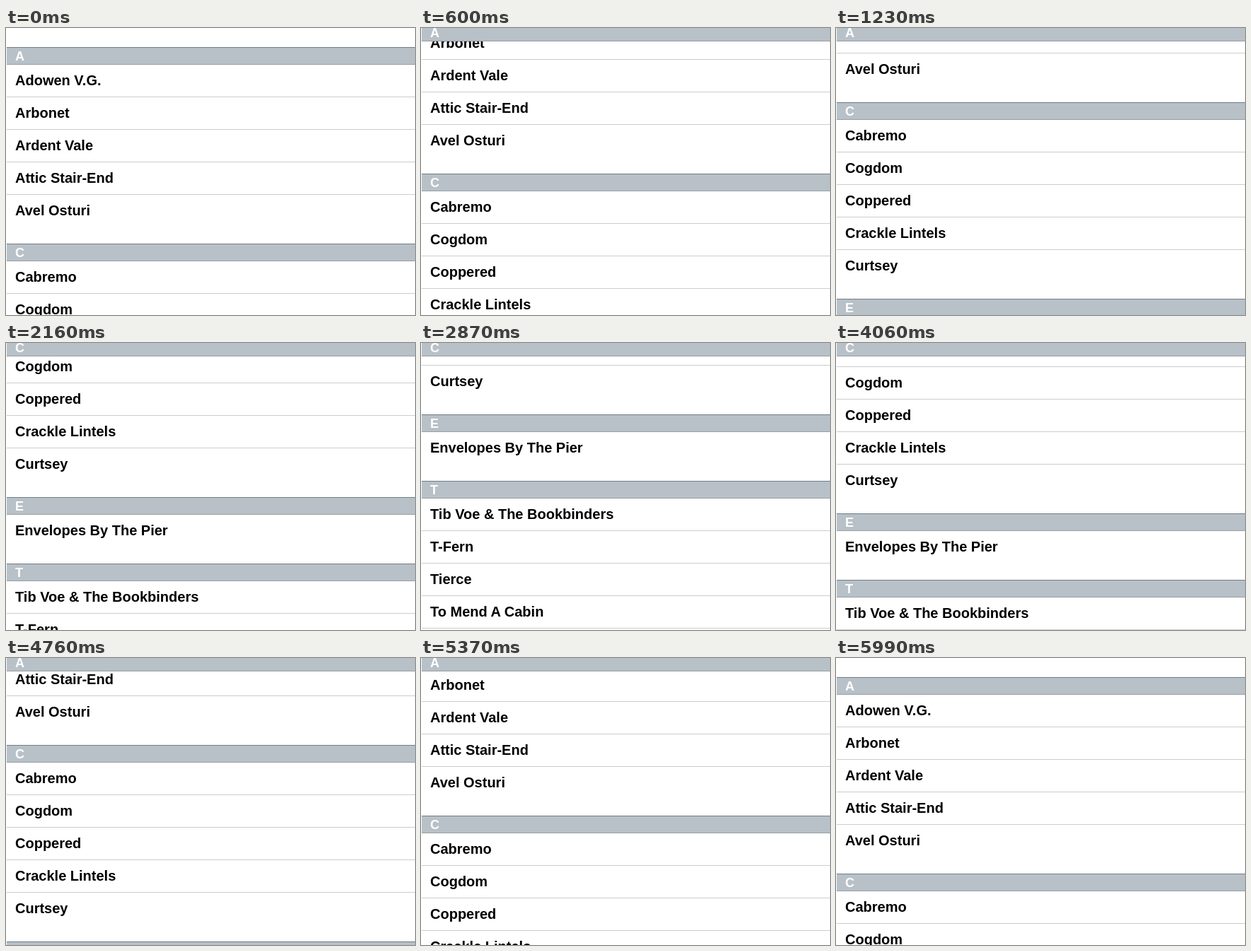
An HTML page that plays this animation: 578x406 px, repeating every 6450 ms.

```html
<!DOCTYPE html>
<html lang="en">
<head>
<meta charset="utf-8">
<title>Sticky list</title>
<style>
  html, body { margin: 0; width: 100%; height: 100%; overflow: hidden; background: #fff; }
  body { position: relative; }
  #list { position: absolute; top: 3px; left: 1px; right: 0; }
  dl { margin: 0; padding-top: 24px; }
  dt, dd { margin: 0; white-space: nowrap; font-family: "Liberation Sans", Arial, sans-serif; font-weight: bold; }
  dt {
    position: relative; z-index: 1; box-sizing: border-box; height: 25px;
    padding: 2px 0 0 12px; font-size: 18px; line-height: 21px;
    color: #fff; background: #b8c1c8;
    border-top: 1px solid #717d85; border-bottom: 1px solid #989ea4;
  }
  dd { padding-left: 12px; font-size: 20px; line-height: 45px; color: #000; }
  dd + dd { border-top: 1px solid #ccc; }
</style>
</head>
<body>
<div id="list"></div>
<script>
const LOOP = 6450, LIST_TOP = 3, STICK_TOP = -6, HEAD = 25;

const sections = {
  A: ["Adowen V.G.", "Arbonet", "Ardent Vale", "Attic Stair-End", "Avel Osturi"],
  C: ["Cabremo", "Cogdom", "Coppered", "Crackle Lintels", "Curtsey"],
  E: ["Envelopes By The Pier"],
  T: ["Tib Voe & The Bookbinders", "T-Fern", "Tierce", "To Mend A Cabin", ""]
};

// Each wheel notch glides the list by NOTCH px: five down, then five up.
const NOTCH = 100, GLIDE = 220, MAX_SCROLL = 482;
const downs = [0, 1, 2, 3, 4].map(i => 390 + 546 * i);
const ups = [3337, 3935, 4507, 5131, 5755];

// The picture refreshes only on this slow clock.
const TICK = 78, TICK_START = 53;

const list = document.getElementById("list");

function add(parent, tag, text = "") {
  const el = parent.appendChild(document.createElement(tag));
  el.textContent = text;
  return el;
}

const heads = Object.entries(sections).map(([letter, rows]) => {
  const dl = add(list, "dl");
  const el = add(dl, "dt", letter);
  rows.forEach(row => add(dl, "dd", row));
  return { el, top: el.offsetTop, last: dl.offsetTop + dl.offsetHeight - HEAD };
});

const clamp = (v, lo, hi) => Math.min(Math.max(v, lo), hi);
const ease = p => 0.5 - 0.5 * Math.cos(Math.PI * clamp(p, 0, 1));

function scrollAt(t) {
  let pos = 0;
  const glide = step => start => {
    const to = clamp(pos + step, 0, MAX_SCROLL);
    pos += (to - pos) * ease((t - start) / GLIDE);
  };
  const begun = start => start <= t;
  downs.filter(begun).forEach(glide(NOTCH));
  ups.filter(begun).forEach(glide(-NOTCH));
  return Math.round(pos);
}

function draw(t) {
  const pos = scrollAt(Math.floor((t - TICK_START) / TICK) * TICK + TICK_START);
  list.style.transform = `translateY(${-pos}px)`;
  for (const { el, top, last } of heads) {
    const y = Math.min(Math.max(top, STICK_TOP - LIST_TOP + pos), last);
    el.style.transform = `translateY(${y - top}px)`;
  }
}

const start = performance.now();
function tick() {
  draw((performance.now() - start) % LOOP);
  requestAnimationFrame(tick);
}
tick();
</script>
</body>
</html>
```
